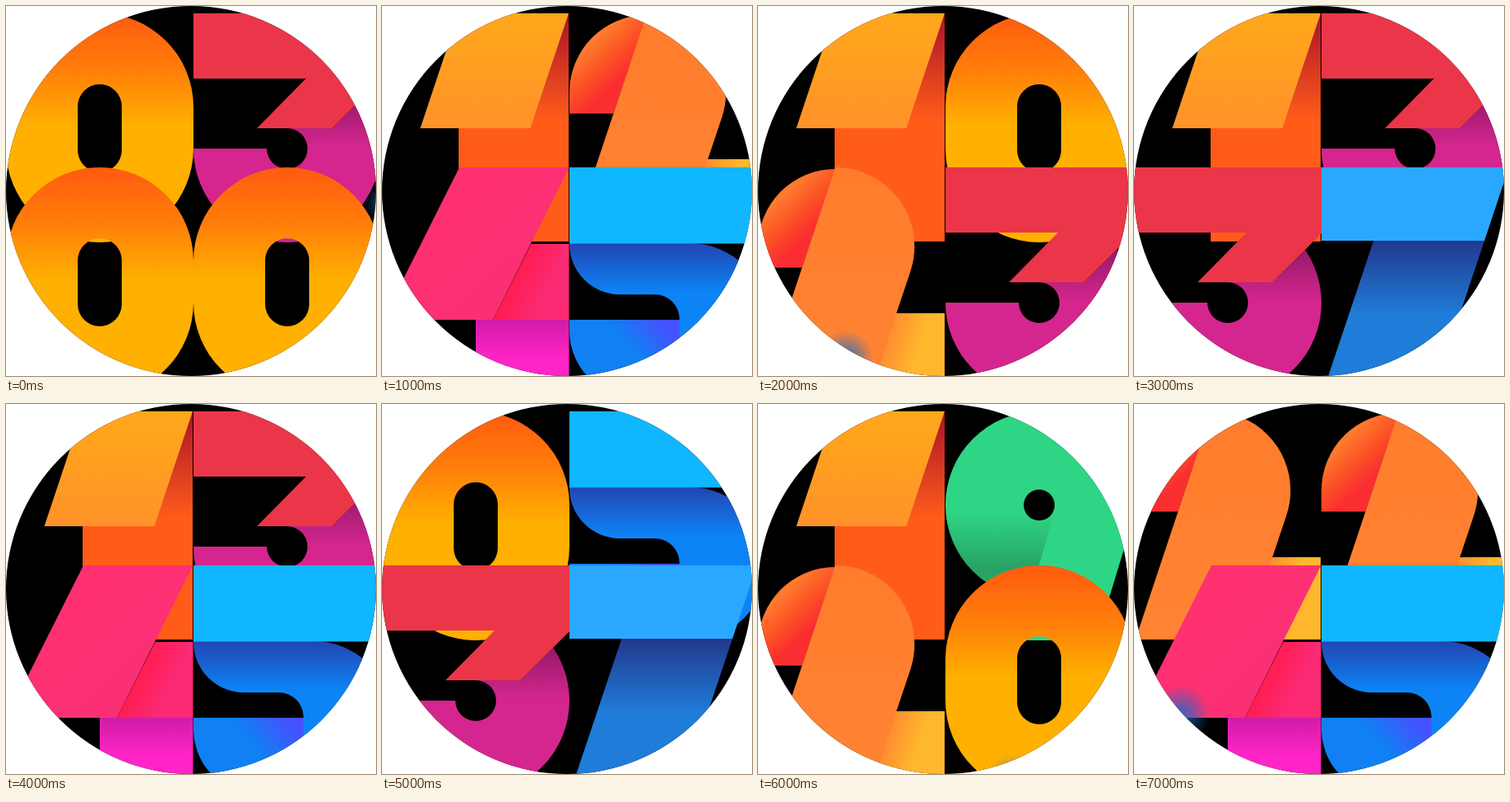
An HTML page with a canvas that plays this animation: 454 px wide and 454 px high, repeating every 8 s.

```html
<!DOCTYPE html>
<html lang="en">
<head>
<meta charset="utf-8">
<title>Bold digits dial</title>
<style>
html, body { margin: 0; width: 100%; height: 100%; overflow: hidden; background: #fff; }
canvas { display: block; width: 454px; height: 454px; }
</style>
</head>
<body>
<canvas id="dial" width="454" height="454"></canvas>
<script>
const ctx = document.getElementById('dial').getContext('2d');
const SIZE = 454, R = SIZE / 2, STEP = 1000;

// Each second shows four digits and, on some, a soft blue spot: [x, y, radius, strength].
const STATES = [
  { digits: '0300', glow: [466, 243, 26, 0.75] },
  { digits: '1245' },
  { digits: '1023', glow: [108, 432, 34, 0.9] },
  { digits: '1337' },
  { digits: '1345' },
  { digits: '0537' },
  { digits: '1920', glow: [312, 462, 32, 0.6] },
  { digits: '2245', glow: [57, 381, 36, 0.9] }
];
const CELLS = [[0, 9], [230, 9], [0, 198], [230, 198]];

function poly(...pts) {
  const p = new Path2D();
  for (let i = 0; i < pts.length; i += 2) p.lineTo(pts[i], pts[i + 1]);
  p.closePath();
  return p;
}

function box(x0, y0, x1, y1) {
  const p = new Path2D();
  p.rect(x0, y0, x1 - x0, y1 - y0);
  return p;
}

function blend(x0, y0, x1, y1, ...colors) {
  const g = ctx.createLinearGradient(x0, y0, x1, y1);
  colors.forEach((c, i) => g.addColorStop(i / (colors.length - 1), c));
  return g;
}

const vertical = (y0, y1, ...colors) => blend(0, y0, 0, y1, ...colors);

function paint(path, fill, rule = 'nonzero') {
  ctx.fillStyle = fill;
  ctx.fill(path, rule);
}

function within(path, draw) {
  ctx.save();
  ctx.clip(path);
  draw();
  ctx.restore();
}

const glyphs = {
  0() {
    const p = new Path2D();
    p.roundRect(0, 0, 230, 281, 115);
    p.roundRect(88, 87, 54, 108, 27);
    paint(p, vertical(0, 138, '#ff5a10', '#ff7e0a', '#ffb000'), 'evenodd');
  },

  1() {
    paint(box(94, 0, 229, 280), vertical(10, 132, '#b0162a', '#d83a20', '#ff5c1a'));
    paint(poly(94, 0, 229, 0, 182, 141, 47, 141), vertical(0, 141, '#ffa81a', '#ff922a'));
  },

  2() {
    const hook = new Path2D();
    hook.moveTo(0, 123);
    hook.lineTo(0, 97);
    hook.arc(95, 97, 95, Math.PI, Math.PI * 1.5);
    hook.lineTo(54, 123);
    hook.closePath();
    paint(hook, blend(22, 42, 60, 82, '#ff7a2e', '#fb5424', '#fa2e30'));

    paint(poly(169, 179, 229, 179, 229, 280, 136, 280),
      blend(154, 218, 194, 231, '#ff8a30', '#ffb72e'));

    const band = new Path2D();
    band.moveTo(95, 0);
    band.arc(95, 97, 97, -Math.PI / 2, Math.atan(1 / 3));
    band.lineTo(136, 280);
    band.lineTo(1.7, 280);
    band.closePath();
    paint(band, vertical(0, 280, '#ff7c2c', '#ff8434'));
  },

  3() {
    within(poly(115, 141, 170, 141, 230, 81, 231, 282, 0, 282, 0, 166, 115, 166), () => {
      const bowl = new Path2D();
      bowl.arc(115, 166, 115, 0, Math.PI * 2);
      bowl.closePath();
      bowl.moveTo(140, 166);
      bowl.arc(115, 166, 25, 0, Math.PI * 2);
      paint(bowl, vertical(104, 165, '#9a1a6c', '#d4268e'), 'evenodd');
    });
    paint(poly(0, 0, 230, 0, 230, 81, 170, 141, 78, 141, 138, 80, 0, 80), '#ea3648');
  },

  4() {
    paint(box(115, 187, 229.5, 281), vertical(187, 235, '#d01ca4', '#ff24c8'));
    paint(poly(183, 94, 229.5, 94, 229.5, 187, 136, 187),
      blend(158, 140, 198, 160, '#ff1c50', '#fa2a74'));
    paint(poly(95, 0, 229.5, 0, 136, 187, 1, 187),
      blend(60, 40, 150, 130, '#ff3070', '#fb3074'));
  },

  5() {
    const foot = new Path2D();
    foot.moveTo(0, 187);
    foot.lineTo(136, 187);
    foot.lineTo(136, 281);
    foot.lineTo(80, 281);
    foot.arc(80, 201, 80, Math.PI / 2, Math.PI);
    foot.closePath();
    paint(foot, blend(76, 222, 112, 188, '#1080f2', '#4452ff'));

    const body = new Path2D();
    body.moveTo(0, 93);
    body.lineTo(148, 93);
    body.arc(148, 187, 94, -Math.PI / 2, Math.PI / 2);
    body.lineTo(135, 281);
    body.lineTo(135, 186);
    body.arcTo(135, 156, 105, 156, 30);
    body.lineTo(62, 156);
    body.arcTo(0, 156, 0, 93, 62);
    body.closePath();
    paint(body, vertical(94, 154, '#2246b4', '#0c84f6'));
    paint(box(0, 0, 230, 93.5), '#10b6ff');
  },

  7() {
    paint(poly(64, 90, 200, 90, 136, 281, 0, 281), vertical(90, 180, '#22388c', '#1f7cd8'));
    paint(poly(0, 0, 230, 0, 200, 90, 0, 90), '#2aa8ff');
  },

  9() {
    const bowl = new Path2D();
    bowl.arc(115, 115, 115, 0, Math.PI * 2);
    bowl.closePath();
    const tail = poly(132, 130, 230, 115, 224, 153, 185, 281, 88, 281);
    const hole = new Path2D();
    hole.rect(-5, -5, 260, 300);
    hole.arc(115, 115, 19, 0, Math.PI * 2);
    ctx.save();
    ctx.clip(hole, 'evenodd');
    paint(bowl, vertical(125, 192, '#2ed584', '#28a364'));
    within(bowl, () => paint(poly(132, 130, 230, 60, 230, 230, 103, 230), '#2ed584'));
    paint(tail, '#2ed584');
    ctx.restore();
  }
};

function drawGlow([x, y, radius, strength]) {
  const g = ctx.createRadialGradient(x, y, 0, x, y, radius);
  g.addColorStop(0, `rgba(20,110,200,${strength})`);
  g.addColorStop(1, 'rgba(20,110,200,0)');
  ctx.fillStyle = g;
  ctx.fillRect(x - radius, y - radius, radius * 2, radius * 2);
}

function draw({ digits, glow }) {
  ctx.fillStyle = '#fff';
  ctx.fillRect(0, 0, SIZE, SIZE);
  const face = new Path2D();
  face.arc(R, R, R, 0, Math.PI * 2);
  within(face, () => {
    ctx.fillStyle = '#000';
    ctx.fillRect(0, 0, SIZE, SIZE);
    CELLS.forEach(([x, y], i) => {
      ctx.save();
      ctx.translate(x, y);
      // Left-hand digits stay inside their own column.
      if (x === 0) ctx.clip(box(0, 0, 230, 282));
      glyphs[digits[i]]();
      ctx.restore();
    });
    if (glow) drawGlow(glow);
  });
}

let start;
function tick(now) {
  start ??= now;
  draw(STATES[Math.floor((now - start) / STEP) % STATES.length]);
  requestAnimationFrame(tick);
}
draw(STATES[0]);
requestAnimationFrame(tick);
</script>
</body>
</html>
```
